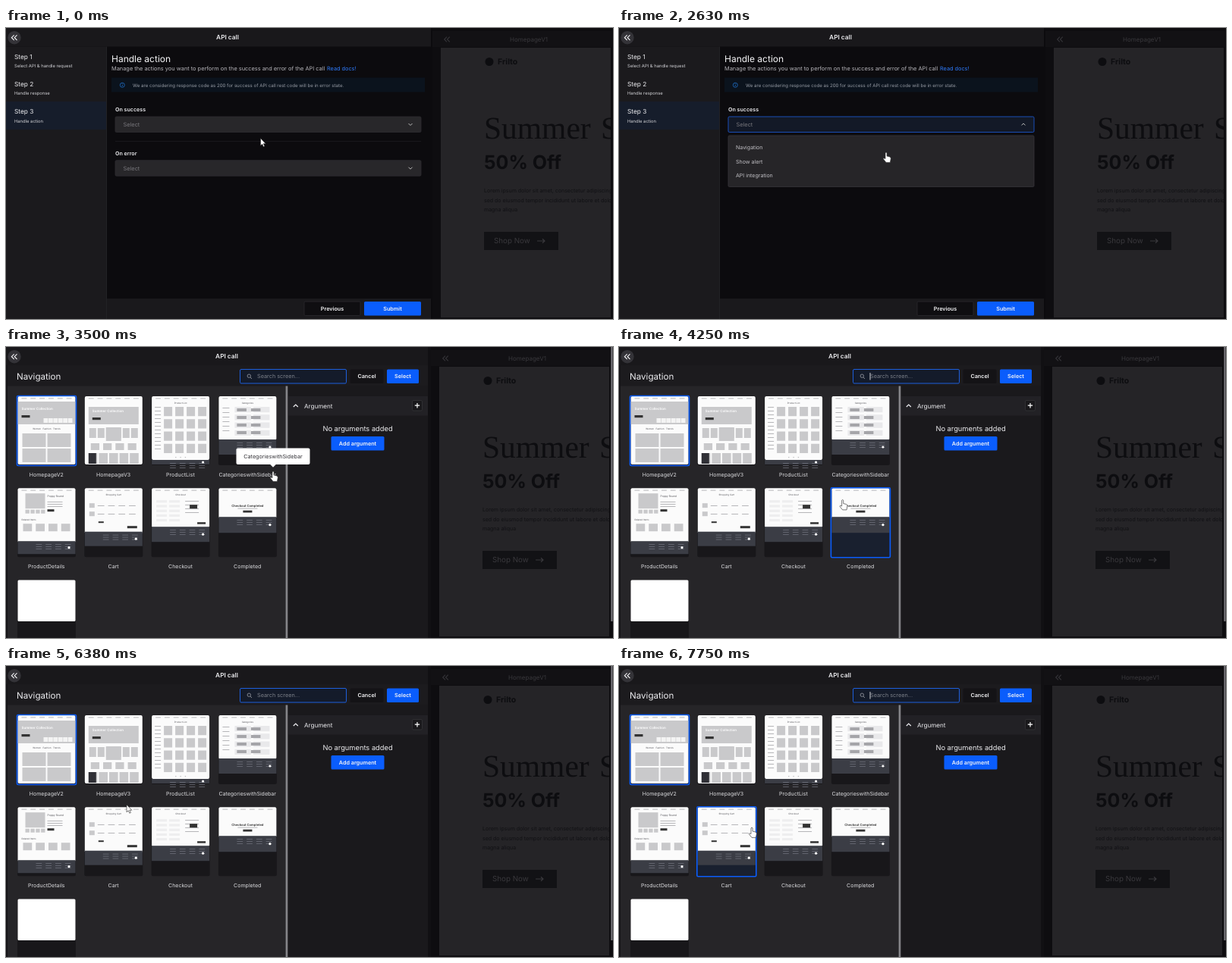
These frames come from a looping animation (800x384 px, 8000 ms). An HTML page:

```html
<!DOCTYPE html>
<html lang="en">
<head>
<meta charset="utf-8">
<title>API call</title>
<style>
html, body { margin: 0; width: 100%; height: 100%; overflow: hidden; background: #0c0b0e; }
svg { display: block; width: 800px; height: 384px; font-family: Inter, "Open Sans", sans-serif; text-rendering: geometricPrecision; }
.serif { font-family: "Liberation Serif", serif; }
.mid { text-anchor: middle; }
.semi { font-weight: 600; }
.bold { font-weight: 700; }
</style>
</head>
<body>
<svg id="stage" viewBox="0 0 800 384"></svg>
<script>
const LOOP = 8000, STEP = 125;
const BLUE = '#0a5dfc', BLACK = '#0c0b0e', PANEL = '#1a191c', RAISED = '#262528';
const LIGHT = '#ececef', INK = '#0d0d10', GRAY = '#c9c9cb';

const rect = (x, y, w, h, fill, more = '') =>
  `<rect x="${x}" y="${y}" width="${w}" height="${h}" fill="${fill}" ${more}/>`;
const text = (x, y, size, str, fill = LIGHT, cls = '') =>
  `<text x="${x}" y="${y}" font-size="${size}" fill="${fill}" class="${cls}">${str}</text>`;
const line = (d, stroke, width = 1) =>
  `<path d="${d}" fill="none" stroke="${stroke}" stroke-width="${width}"/>`;
const circle = (x, y, r, fill, more = '') => `<circle cx="${x}" cy="${y}" r="${r}" fill="${fill}" ${more}/>`;
const group = (id, body) => `<g id="${id}">${body}</g>`;
const outline = (color, width = 1) => `rx="1.5" stroke="${color}" stroke-width="${width}"`;
const column = (items, y, pitch, make) => items.map((s, i) => make(s, y + i * pitch, i)).join('');

// Evenly divides a box into cols by rows
function grid(cols, rows, x, y, w, h, gap = 2, fill = GRAY) {
  const cw = (w + gap) / cols, ch = (h + gap) / rows;
  return Array.from({ length: cols * rows }, (_, i) =>
    rect(x + i % cols * cw, y + Math.floor(i / cols) * ch, cw - gap, ch - gap, fill)).join('');
}
// Greeked text: thin rows inside a box
function greek(cols, rows, x, y, w, pitch = 3, fill = '#a5a5a9') {
  return Array.from({ length: rows }, (_, i) => grid(cols, 1, x, y + i * pitch, w, .8, 5, fill)).join('');
}

const chevrons = (x, y, color) =>
  line(`M${x} ${y - 3.4}l-3.3 3.4 3.3 3.4m3.8-6.8l-3.3 3.4 3.3 3.4`, color, 1.2);
const button = (x, y, w, label, fill, border = 'none') =>
  rect(x, y, w, 18.5, fill, outline(border, .8)) +
  text(x + w / 2, y + 11.8, 7.2, label, '#f4f4f6', 'mid semi');
const header = x => rect(0, 0, 560, 24.5, '#19181b') + circle(11, 12.7, 8.7, '#343338') +
  chevrons(10.7, 12.7, '#f0f0f2') + text(x, 15.3, 8.3, 'API call', LIGHT, 'mid semi');

function preview() {
  const lorem = ['Lorem ipsum dolor sit amet, consectetur adipiscing',
    'sed do eiusmod tempor incididunt ut labore et dolore', 'magna aliqua'];
  return rect(562, 0, 240, 384, '#0e0d10') + rect(562, 4, 236, 21, '#121114') +
    chevrons(581, 15, '#333237') + text(689, 18, 8, 'HomepageV1', '#39383c', 'mid') +
    rect(573, 26, 224, 356, '#252427') + '<g clip-path="url(#pageClip)">' +
    circle(637, 44.5, 5.5, INK) + text(648, 48, 10.5, 'Frilto', INK, 'bold') +
    text(630, 146, 41.5, 'Summer', INK, 'serif') + text(784, 146, 41.5, 'S', INK, 'serif') +
    text(630, 185.5, 25, '50% Off', INK, 'bold') +
    column(lorem, 217, 12.6, (s, y) => text(630, y, 7, s, '#111114')) +
    rect(630, 269, 98, 24, '#121215') + text(643, 284.3, 9.8, 'Shop Now', '#39383c') +
    line('M700 281h10m-3-2.8l3 2.8-3 2.8', '#39383c', 1.2) + '</g>';
}

const field = (id, y) => rect(144, y, 403, 20.5, '#28272a', `id="${id}" ${outline('#2e2d31', .8)}`) +
  text(154.5, y + 12.9, 7.4, 'Select', '#77767b') +
  `<g transform="translate(533 ${y + 10.2})"><path id="${id}Mark" d="M-2.5-1.2l2.5 2.5 2.5-2.5" fill="none" stroke="#bbb"/></g>`;

function wizard() {
  const steps = ['Select API &amp; handle request', 'Handle response', 'Handle action'];
  const options = ['Navigation', 'Show alert', 'API integration'];
  return header(292) + rect(0, 24.5, 132, 360, '#1b1a1d') + rect(0, 97, 132, 37, '#161d2b') +
    column(steps, 40.6, 36.4, (s, y, i) =>
      text(11, y, 8.3, `Step ${i + 1}`) + text(11, y + 11.2, 5.85, s, '#d2d2d6')) +
    rect(132, 24.5, .8, 360, '#29282c') +
    text(139, 45, 12, 'Handle action', '#f4f4f6') +
    text(139, 55.6, 7.4, 'Manage the actions you want to perform on the success and error of the API call', '#b4b3b8') +
    text(423, 55.6, 7.3, 'Read docs!', '#2f7dff') +
    rect(139, 65.5, 413, 19, '#0b131d') +
    circle(153.3, 75.3, 3, 'none', 'stroke="#1f6fc8" stroke-width=".8"') +
    line('M153.3 74.8v2.1m0-3.6v.8', '#1f6fc8', .8) +
    text(167, 77.6, 6.13, 'We are considering response code as 200 for success of API call rest code will be in error state.', '#969ba4') +
    text(144, 110.3, 7.1, 'On success', LIGHT, 'semi') + field('success', 117) +
    rect(154, 122.5, .8, 9, '#fff', 'id="fieldCaret"') +
    group('errorPart', line('M144 149.5H547', '#1d1c20', .8) +
      text(144, 168.3, 7.1, 'On error', LIGHT, 'semi') + field('error', 174.7)) +
    group('menu', rect(144, 142, 403, 67.5, RAISED, outline('#38373b', .8)) +
      column(options, 160.3, 18.2, (s, y) => text(154, y, 7.05, s, '#c2c1c6'))) +
    rect(133, 357, 427, 27, PANEL) +
    button(393, 361, 74, 'Previous', '#0f0e11', '#2b2a2f') + button(472, 361, 75, 'Submit', BLUE);
}

// Thumbnails use a local 76-wide box
const paper = height => rect(0, 0, 76, height, '#fbfbfb', 'rx="2"') + greek(6, 1, 5, 2.5, 66);
const foot = (y, h) => rect(0, y, 76, h, '#3b3d45') + greek(4, 3, 24, y + 4, 46, 3, '#6c6f78') +
  circle(67.5, y + h / 2, 1.6, '#fff');
const title = (s, y = 10) => text(38, y, 3, s, '#55555a', 'mid');
const heroTitle = (x, y) => text(x, y, 4.5, 'Summer Collection', '#fff', 'semi') + rect(x, y + 7, 11, 3.2, '#333');

const thumbs = [
  { label: 'HomepageV2', art: paper(90) + rect(0, 7, 76, 30, GRAY) + heroTitle(5, 18) +
    grid(6, 1, 34, 29, 38, 6, .6, '#f4f4f4') + title('Women &#160; Fashion &#160; Trends', 44) +
    grid(2, 2, 6, 49, 64, 38) },
  { label: 'HomepageV3', art: paper(90) + rect(5, 14, 66, 23, GRAY) + heroTitle(10, 21) +
    grid(6, 1, 6, 42, 64, 13) + rect(28, 41, 20, 18, GRAY) + grid(4, 1, 8, 62, 60, 9, 5) +
    grid(5, 1, 5, 75, 66, 14) + rect(5, 75, 10, 14, '#303036') },
  { label: 'ProductList', art: paper(84) + title('Product List') + greek(1, 12, 4, 14, 8, 5) +
    grid(4, 4, 16, 14, 56, 61, 4) + greek(3, 1, 31, 80, 14) + foot(84, 6) },
  { label: 'CategorieswithSidebar', art: paper(58) + title('Categories') + greek(1, 6, 5, 15, 9, 6) +
    grid(2, 4, 21, 14, 46, 38, 3, '#e9e9eb') + grid(2, 4, 24, 16, 31, 34, 6, '#a5a5a9') + foot(57, 20) },
  { label: 'ProductDetails', art: paper(72) + rect(10, 7, 26, 20, GRAY) + grid(4, 1, 10, 28.5, 26, 5, 1.5) +
    text(39, 12, 3.4, 'Poppy Round', '#55555a') + greek(1, 3, 39, 18, 20) + rect(39, 28, 9, 3, '#333') +
    text(5, 43, 3, 'Related Items', '#55555a') + grid(4, 1, 7, 47, 62, 10, 5) + foot(70, 17) },
  { label: 'Cart', art: paper(60) + title('Shopping Cart') + grid(1, 2, 6, 20, 7, 17, 5) +
    greek(4, 2, 17, 23, 50, 11) + rect(18, 44, 7, 2, '#333') + rect(56, 50, 13, 3, '#333') + foot(57.5, 19) },
  { label: 'Checkout', art: paper(52) + title('Checkout') + grid(2, 5, 6, 16, 31, 28, 3, '#eeeeef') +
    greek(1, 4, 44, 17, 18, 5) + rect(50, 22, 10, 5, '#333') + rect(60, 45, 11, 2.5, '#333') + foot(51, 20) },
  { label: 'Completed', art: paper(40) + text(38, 24.5, 4.1, 'Checkout Completed', '#444', 'mid bold') +
    greek(1, 1, 25, 26.5, 26) + rect(32, 29.5, 12, 2.8, '#333') + foot(38, 21) },
  { label: '', art: rect(0, 0, 76, 54.5, '#fff', 'rx="1.5"') }
];
const cell = i => ({ x: 14 + i % 4 * 88.3, y: 64 + Math.floor(i / 4) * 121.2 });
const frame = id => rect(.5, .5, 78, 92, 'none', `id="${id}" ${outline(BLUE, 1.6)}`);

function screenPicker() {
  const cards = thumbs.map(({ label, art }, i) => {
    const { x, y } = cell(i);
    return `<g transform="translate(${x} ${y})">` + rect(1, 1, 77, 91, '#18171a', `id="card${i}" rx="2"`) +
      `<g transform="translate(1.5 1)">${art}</g>` + text(39.3, 106.8, 7.03, label, '#dddde0', 'mid') + '</g>';
  }).join('');
  return header(291) + rect(556, 0, 4, 384, '#111013') + rect(0, 24, 556, 360, '#151417') +
    rect(2, 24.5, 554, 360, RAISED) + rect(2, 24.5, 554, 27, '#1c1b1e') +
    text(14, 43, 11.6, 'Navigation') +
    rect(308.5, 29.5, 140, 18.5, '#141b2a', outline('#1d5fdc')) +
    circle(320.3, 38.2, 2.2, 'none', 'stroke="#a0a3aa" stroke-width=".8"') + line('M322 40l2 2', '#a0a3aa', .8) +
    text(331, 41.4, 7.3, 'Search screen...', '#7d818a') + rect(330.6, 34, .8, 9.5, '#fff', 'id="searchCaret"') +
    button(453.5, 29.5, 44, 'Cancel', '#141316') + button(502, 29.5, 42, 'Select', BLUE) +
    cards + `<g transform="translate(14 64)">${frame('chosen')}</g>` + frame('hover') +
    rect(372, 51, 184, 333, PANEL) + rect(372, 65, 184, 25.5, '#222125') + rect(368.6, 51.5, 2.6, 333, '#858488') +
    line('M378.8 79l3-3 3 3', LIGHT, 1.2) + text(393, 80.6, 8.1, 'Argument') +
    rect(535.5, 70.5, 13, 13.5, '#19181b', outline('#39383c', .7)) + line('M538.8 77.2h6.4m-3.2-3.2v6.4', '#fff', 1.2) +
    text(463.5, 111, 9.3, 'No arguments added', LIGHT, 'mid') + button(428.5, 118, 70, 'Add argument', BLUE) +
    rect(797.3, 0, 2.2, 362, '#77767b') +
    group('tip', rect(303.5, 133.5, 97, 21.5, '#fff', 'rx="2"') + '<path d="M348 154.8l4 4 4-4z" fill="#fff"/>' +
      text(352, 146.8, 7.2, thumbs[TIP_CARD].label, '#333237', 'mid'));
}

const TIP_CARD = 3;
const shape = (id, d) => `<path id="${id}" d="${d}" fill="#fff" stroke="#222" stroke-width=".6"/>`;
const pointer = shape('arrow', 'M0 0v9.8l2.2-2 1.6 3.4 1.6-.7-1.6-3.3h3z') +
  shape('hand', 'M-1 .8q1-1.6 2.1 0v4.3l3.8.9q1.6.6 1.4 2.4l-.9 5h-5.4l-3.7-4.7q0-1.7 2.7-.2z');

document.getElementById('stage').innerHTML =
  '<clipPath id="pageClip"><path d="M573 26h224v356H573z"/></clipPath>' + rect(0, 0, 800, 384, BLACK) +
  group('preview', preview()) + group('wizard', wizard()) + group('picker', screenPicker()) + group('pointer', pointer);

const el = id => document.getElementById(id);
const show = (id, on) => el(id).style.display = on ? '' : 'none';
const set = (id, attrs) => Object.entries(attrs).forEach(([k, v]) => el(id).setAttribute(k, v));
const moveTo = (id, { x, y }) => set(id, { transform: `translate(${x} ${y})` });
const blink = (t, period, from) => (t - from + period) % period < period / 2;

const OPEN_AT = 1250, PICK_AT = 2750, TIP_AT = 3125;
const origin = { x: 335.5, y: 145.5 };
const moves = [
  { from: 0, to: 250, x: 340, y: 128 },
  { from: 1750, to: 2375, x: 352, y: 164 },
  { from: 3500, to: 4875, x: 251, y: 230 },
  { from: 4875, to: 6375, x: 159, y: 183 },
  { from: 6375, to: 6750, x: 172, y: 207 },
  { from: 7000, to: 7750, x: 175, y: 213 }
];
function pointerAt(t) {
  return moves.reduce((p, m) => {
    const k = Math.max(0, Math.min(1, (t - m.from) / (m.to - m.from)));
    const ease = k * k * (3 - 2 * k);
    return { x: p.x + (m.x - p.x) * ease, y: p.y + (m.y - p.y) * ease };
  }, origin);
}
const cardAt = (p, top, bottom) => thumbs.findIndex((_, i) => {
  const dx = p.x - cell(i).x, dy = p.y - cell(i).y;
  return dx >= 0 && dx <= 79 && dy >= top && dy <= bottom;
});

function draw(time) {
  const t = Math.floor(time / STEP) * STEP;
  const open = t >= OPEN_AT, picking = t >= PICK_AT;
  show('wizard', !picking);
  show('picker', picking);
  moveTo('preview', { x: picking ? -2 : 0, y: 0 });

  show('menu', open);
  show('errorPart', !open);
  set('success', open ? { fill: '#131927', stroke: '#1c5de0' } : { fill: '#28272a', stroke: '#2e2d31' });
  set('successMark', { transform: `scale(1 ${open ? -1 : 1})` });
  show('fieldCaret', open && blink(t, 1000, 875));
  show('searchCaret', blink(t, 1200, 490));

  const p = pointerAt(t);
  const hovered = picking ? cardAt(p, 0, 93) : -1;
  const labelled = picking ? cardAt(p, 93, 112) : -1;
  const hand = picking ? hovered + labelled > -2 : open;
  const overField = !picking && p.y > 117 && p.y < 138;
  show('pointer', !overField);
  moveTo('pointer', p);
  show('arrow', !hand);
  show('hand', hand);

  show('hover', hovered >= 0);
  if (hovered >= 0) moveTo('hover', cell(hovered));
  thumbs.forEach((_, i) => set('card' + i, { fill: i === hovered ? '#19202f' : '#18171a' }));
  show('tip', labelled === TIP_CARD && t >= TIP_AT);
}

const start = performance.now();
function tick() {
  draw((performance.now() - start) % LOOP);
  requestAnimationFrame(tick);
}
tick();
</script>
</body>
</html>
```
